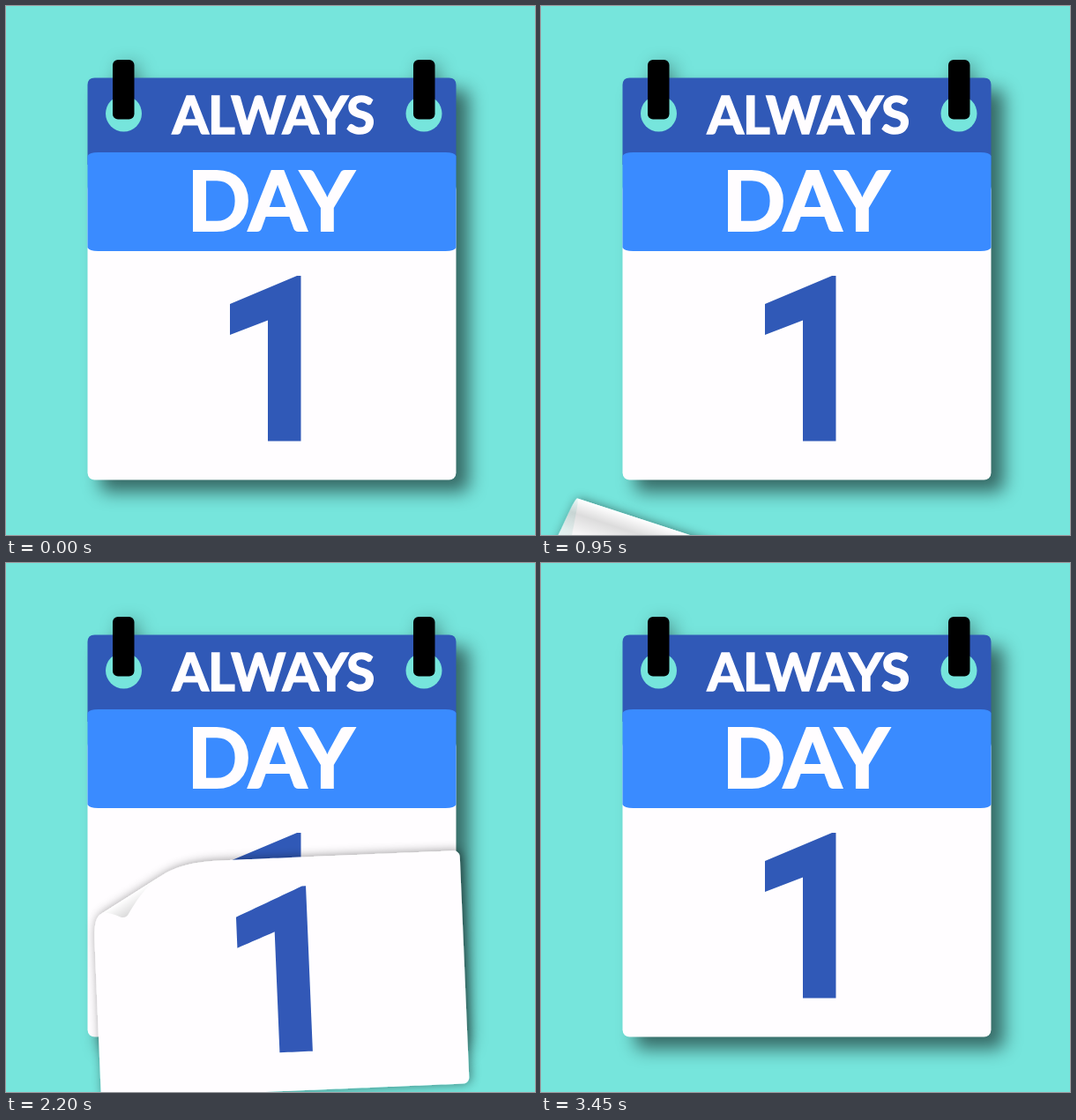
Animation, 600 px wide and 600 px high, one loop 3500 ms. Source, as an HTML page:

```html
<!DOCTYPE html>
<html lang="en">
<head>
<meta charset="utf-8">
<title>Always day 1</title>
<style>
  html, body { margin: 0; width: 100%; height: 100%; overflow: hidden; background: #76e5dc; }
  svg { display: block; width: 100%; height: 100%; }
  text { font-family: Lato, sans-serif; font-weight: 700; fill: #fffdff; stroke: #fffdff; text-anchor: middle; }
</style>
</head>
<body>
<svg viewBox="0 0 600 600">
  <defs>
    <filter id="soft" filterUnits="userSpaceOnUse" x="0" y="0" width="600" height="600">
      <feGaussianBlur stdDeviation="10"/>
    </filter>
    <filter id="lift" filterUnits="userSpaceOnUse" x="-100" y="0" width="800" height="1100">
      <feDropShadow dx="2" dy="0" stdDeviation="6" flood-opacity=".45"/>
    </filter>
    <linearGradient id="roll" gradientUnits="userSpaceOnUse">
      <stop offset="0" stop-color="#ffffff"/>
      <stop offset=".25" stop-color="#d6d6d6"/>
      <stop offset=".55" stop-color="#f4f4f4"/>
      <stop offset="1" stop-color="#ffffff"/>
    </linearGradient>
  </defs>

  <rect width="600" height="600" fill="#76e5dc"/>
  <g filter="url(#soft)">
    <rect x="107" y="95" width="418" height="456" rx="8" opacity=".54"/>
    <rect x="127" y="66" width="24" height="60" rx="6" opacity=".35"/>
    <rect x="468" y="66" width="24" height="60" rx="6" opacity=".35"/>
  </g>
  <rect x="92.5" y="200" width="418" height="337.5" rx="8" fill="#fffdff"/>
  <path id="digit" fill="#3059b7"/>

  <g id="sheet" filter="url(#lift)">
    <path id="front" fill="#fffdff"/>
    <path id="frontDigit" fill="#3059b7"/>
    <path id="flap" fill="url(#roll)" opacity=".85"/>
  </g>

  <path d="M92.5 180V89.5Q92.5 81.5 100.5 81.5H502.5Q510.5 81.5 510.5 89.5V180Z" fill="#3059b7"/>
  <path d="M92.5 170Q94.5 166 104.5 166H498.5Q508.5 166 510.5 170V274Q508.5 278 498.5 278H104.5Q94.5 278 92.5 274Z" fill="#3a8bff"/>
  <text x="303.2" y="145.3" font-size="59" stroke-width="1.7" letter-spacing="-.6">ALWAYS</text>
  <text x="300.2" y="255" font-size="94.5" stroke-width="2.2">DAY</text>
  <circle cx="133.5" cy="122" r="20.5" fill="#76e5dc"/>
  <circle cx="474" cy="122" r="20.5" fill="#76e5dc"/>
  <rect x="121" y="61" width="24.5" height="67.5" rx="6"/>
  <rect x="462" y="61" width="24.5" height="67.5" rx="6"/>
</svg>
<script>
const $ = id => document.getElementById(id);
const LOOP = 3500, STEP = 50;
const LEFT = 92.5, RIGHT = 510.5, TOP = 273, W = RIGHT - LEFT, H = 264.5, R = 28;
const RAD = Math.PI / 180;
const DIGIT = [[254, 338], [330, 306], [334.5, 306], [334.5, 493.5], [297, 493.5], [297, 356.5], [254, 373]];

// Each fall: pinned side, timing, drift as [amount at u = 1, power], curl line as [at u = 1, rate].
const falls = [
  { side: 1, start: 0, end: 1050, unit: 400, dx: [6, 1.86], dy: [54, 1.43], turn: [2.6, 1.67], line: [-120, 182], tilt: [20, -9.45] },
  { side: -1, start: 1780, end: 3150, unit: 420, dx: [4, 1.8], dy: [53, 1.74], turn: [2.4, 1.67], line: [-149, 158], tilt: [30, -4.8] }
];

const path = pts => pts.length ? 'M' + pts.map(p => p[0].toFixed(2) + ' ' + p[1].toFixed(2)).join('L') + 'Z' : '';

function dense(pts, gap = 5) {
  const out = [];
  pts.forEach((a, i) => {
    const b = pts[(i + 1) % pts.length];
    const n = Math.max(1, Math.ceil(Math.hypot(b[0] - a[0], b[1] - a[1]) / gap));
    for (let k = 0; k < n; k++) out.push([a[0] + (b[0] - a[0]) * k / n, a[1] + (b[1] - a[1]) * k / n]);
  });
  return out;
}

// Part of a polygon where f >= 0.
function cut(pts, f) {
  const out = [];
  pts.forEach((a, i) => {
    const b = pts[(i + 1) % pts.length], fa = f(a), fb = f(b);
    if (fa >= 0) out.push(a);
    if ((fa >= 0) !== (fb >= 0)) {
      const k = fa / (fa - fb);
      out.push([a[0] + (b[0] - a[0]) * k, a[1] + (b[1] - a[1]) * k]);
    }
  });
  return out;
}

function roundRect(w, h, r) {
  const pts = [];
  [[w - r, r, -90], [w - r, h - r, 0], [r, h - r, 90], [r, r, 180]].forEach(([x, y, a]) => {
    for (let k = 0; k <= 6; k++) {
      const g = (a + k * 15) * RAD;
      pts.push([x + r * Math.cos(g), y + r * Math.sin(g)]);
    }
  });
  return dense(pts);
}

const page = roundRect(W, H, 7);
const digitOn = side => dense(DIGIT.map(([x, y]) => [side > 0 ? x - LEFT : RIGHT - x, y - TOP]));
falls.forEach(f => f.digit = digitOn(f.side));
$('digit').setAttribute('d', path(DIGIT));

function drawSheet(f, age) {
  const u = age / f.unit;
  const grow = ([size, power]) => size * u ** power;
  const ramp = ([base, rate]) => base + rate * (u - 1);
  const turn = grow(f.turn) * RAD, c = Math.cos(turn), s = Math.sin(turn);
  const ax = (f.side > 0 ? LEFT : RIGHT) - f.side * grow(f.dx), ay = TOP + grow(f.dy);
  const tilt = ramp(f.tilt) * RAD, tx = Math.cos(tilt), ty = Math.sin(tilt), line = ramp(f.line);

  const place = (x, y) => [ax + f.side * (x * c - y * s), ay + x * s + y * c];
  const past = ([x, y]) => x * ty - (y - line) * tx;
  // Wrap paper beyond the line around a cylinder of radius R.
  const curl = p => {
    const d = past(p);
    if (d <= 0) return place(p[0], p[1]);
    const along = p[0] * tx + (p[1] - line) * ty;
    const out = d < Math.PI * R ? R * Math.sin(d / R) : Math.PI * R - d;
    return place(along * tx + out * ty, line + along * ty - out * tx);
  };
  const edge = Math.PI * R / 2;
  const show = (id, pts, side) => $(id).setAttribute('d', path(cut(pts, p => side * (past(p) - edge)).map(curl)));
  show('front', page, -1);
  show('frontDigit', f.digit, -1);
  show('flap', page, 1);

  const g = $('roll'), a = place(R * ty, line - R * tx), b = place(-40 * ty, line + 40 * tx);
  [['x1', a[0]], ['y1', a[1]], ['x2', b[0]], ['y2', b[1]]].forEach(([k, v]) => g.setAttribute(k, v));
}

function render(ms) {
  const t = Math.floor(ms % LOOP / STEP) * STEP;
  const f = falls.find(f => t > f.start && t < f.end);
  $('sheet').style.display = f ? '' : 'none';
  if (f) drawSheet(f, t - f.start);
}

let began;
function tick(now) {
  began ??= now;
  render(now - began);
  requestAnimationFrame(tick);
}
render(0);
requestAnimationFrame(tick);
</script>
</body>
</html>
```
